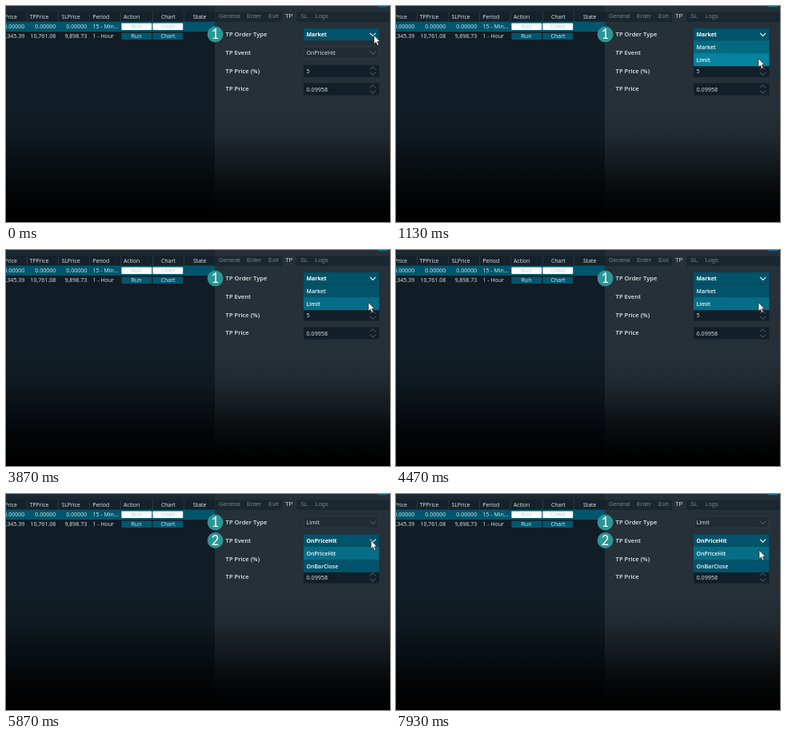
An HTML page that plays this animation: 480x270 px, repeating every 8000 ms.

```html
<!DOCTYPE html>
<html lang="en">
<head>
<meta charset="utf-8">
<title>Order settings</title>
<style>
  html, body { margin: 0; width: 100%; height: 100%; overflow: hidden; background: #000; }
  svg { display: block; width: 480px; height: 270px; }
  text { font: 500 7px "Open Sans", "Noto Sans", sans-serif; fill: #e2e8eb; white-space: pre; }
  .end { text-anchor: end; }
  .mid { text-anchor: middle; }
  .head { font-size: 6.9px; }
  .tab { font: 7.5px "Liberation Sans", Arial, sans-serif; }
  .label { font-size: 7.6px; font-weight: 600; }
  .value { font-size: 7.2px; }
  .item { font-weight: 600; fill: #f4f9fb; }
  .strong { font-weight: 700; fill: #fff; }
  .hover { font-weight: 600; fill: #4bbbdc; }
  .badge { font: 16.5px Lato, sans-serif; fill: #fff; text-anchor: middle; }
</style>
</head>
<body>
<svg id="stage" viewBox="0 0 480 270"></svg>
<script>
const LOOP = 8000;
const TEAL = '#00536a', HOVER = '#066d87', PANEL = '#253038';

const rect = (x, y, w, h, fill, extra = '') =>
  `<rect x="${x}" y="${y}" width="${w}" height="${h}" fill="${fill}" ${extra}/>`;
const text = (x, y, str, cls = '', extra = '') =>
  `<text x="${x}" y="${y}" class="${cls}" ${extra}>${str}</text>`;
const path = (d, stroke, width = 1) =>
  `<path d="${d}" fill="none" stroke="${stroke}" stroke-width="${width}"/>`;
const clamp = v => Math.max(0, Math.min(1, v));
const ease = (t, from, to) => { const k = clamp((t - from) / (to - from)); return k * k * (3 - 2 * k); };
const mix = (a, b, k) => 'rgb(' + a.map((v, i) => Math.round(v + (b[i] - v) * k)) + ')';

function table() {
  let s = rect(0, 0, 261, 270, '#111d26') + rect(0, 0, 261, 7.5, '#1b2830') +
    rect(0, 8, 261, 11, '#15222b') + rect(0, 19.5, 261, 12.5, '#00566d');
  for (const x of [26, 65, 104, 143, 183, 222]) s += rect(x, 8, .7, 11, '#33424c');
  [[-2, 'Price'], [29.5, 'TPPrice'], [69.5, 'SLPrice'], [108.3, 'Period'],
   [147, 'Action'], [194, 'Chart'], [234, 'State']].forEach(([x, h]) => s += text(x, 16, h, 'head'));
  [['0.00000', '0.00000', '0.00000', '15 - Min...'],
   ['10,345.39', '10,761.08', '9,898.73', '1 - Hour']].forEach((row, i) => {
    const y = 28.3 + 12 * i;
    row.slice(0, 3).forEach((v, j) => s += text(23.2 + 39 * j, y, v, 'end'));
    s += text(108.5, y, row[3]);
    ['Run', 'Chart'].forEach((v, j) => {
      s += rect(144.4 + 39 * j, 21.4 + 12 * i, 37.8, 8.7, i ? '#00566d' : '#fdfeff', 'rx=".8"') +
        text(163 + 39.5 * j, y, v, 'mid', i ? '' : 'style="fill:#9fd6ea"');
    });
  });
  return s;
}

function panel() {
  let s = rect(261, 0, 219, 270, PANEL) + rect(261, 7.5, 219, 12.5, '#1b272f') +
    rect(345, 7.5, 18, 12.5, PANEL) + rect(464.5, 0, 12.5, 1.3, '#08708f');
  [[266, 'General'], [301, 'Enter'], [328, 'Exit'], [349, 'TP'], [368, 'SL'], [386.5, 'Logs']]
    .forEach(([x, name]) => s += text(x, 15.3, name, 'tab', `style="fill:${name === 'TP' ? '#cfd6da' : '#74828b'}"`));
  ['TP Order Type', 'TP Event', 'TP Price (%)', 'TP Price']
    .forEach((name, i) => s += text(274.6, 38 + 22.8 * i, name, 'label'));
  [[73.7, '5'], [96.5, '0.09958']].forEach(([y, v]) => {
    s += rect(372, y, 94.5, 15, '#131f28') + text(375.5, y + 10.2, v, 'value') +
      path(`M455 ${y + 5.8}l3.5 -3.5l3.5 3.5M455 ${y + 9.2}l3.5 3.5l3.5 -3.5`, '#66747d', .9);
  });
  return s;
}

const shade = '<defs><linearGradient id="dark" x1="0" y1="0" x2="0" y2="1">' +
  [0, .15, .48, .82, 1].map((a, i) => `<stop offset="${i / 4}" stop-color="#000" stop-opacity="${a}"/>`).join('') +
  '</linearGradient></defs>' + rect(0, 130, 480, 135, 'url(#dark)') + rect(0, 265, 480, 5, '#000');

// mode: idle, hover or open
function combo(y, value, mode) {
  const open = mode === 'open', hover = mode === 'hover';
  return rect(372.5, y + .2, 93.5, 14.4, open ? TEAL : hover ? '#1a2831' : '#202b33',
      `stroke="${open ? TEAL : hover ? '#12414f' : '#303c44'}" stroke-width=".8"`) +
    text(375.5, y + 10.2, value, open ? 'strong' : hover ? 'hover' : 'value') +
    path(`M455 ${y + 5.8}l3.6 3.6l3.6 -3.6`, open ? '#e8f2f5' : '#66747d', open ? 1.2 : .9);
}

function list(y, items, fills) {
  return items.map((item, i) => rect(372, y + 16 * i, 94.5, 16, fills[i]) +
    text(375.5, y + 10.8 + 16 * i, item, 'item')).join('');
}

const badge = (y, n, alpha = 1) => `<g opacity="${alpha}"><circle cx="261.6" cy="${y}" r="9.9" fill="#2b9696"/>` +
  text(261.6, y + 5.8, n, 'badge') + '</g>';

const stops = [[670, 460, 36.5], [1130, 453, 65.5], [5000, 453, 65.5], [5400, 456.2, 57.8],
  [5870, 456.2, 57.8], [6450, 454, 70.2]];
function cursor(t) {
  let [, x, y] = stops[0];
  stops.slice(1).forEach(([end, nx, ny], i) => {
    const k = ease(t, stops[i][0], end), [, px, py] = stops[i];
    x += (nx - px) * k;
    y += (ny - py) * k;
  });
  return `<path transform="translate(${x} ${y}) scale(1.12)" d="M0 0V9.8L2.2 7.8L3.7 11.4L5.4 10.7L3.9 7.2H6.9Z"
    fill="#fff" stroke="#111" stroke-width=".6"/>`;
}

function live(t) {
  const chosen = t >= 5000, firstOpen = t >= 270 && !chosen, secondOpen = t >= 5870;
  let s = combo(28, chosen ? 'Limit' : 'Market', chosen ? 'idle' : 'open') +
    combo(50.8, 'OnPriceHit', secondOpen ? 'open' : t >= 5250 ? 'hover' : 'idle');
  if (firstOpen) {
    const dim = ease(t, 2330, 3870), over = t >= 950;
    s += list(43.2, ['Market', 'Limit'], [
      mix([2, 106, 128], [0, 83, 106], dim),
      over ? mix([6, 131, 158], [6, 109, 135], dim) : TEAL]);
  }
  if (secondOpen) s += list(66, ['OnPriceHit', 'OnBarClose'], [HOVER, TEAL]);
  return s + badge(35.4, 1) + badge(58, 2, ease(t, 5000, 5400)) + cursor(t);
}

const stage = document.getElementById('stage');
stage.innerHTML = table() + panel() + shade + '<g id="live"></g>';
const layer = document.getElementById('live');
const start = performance.now();
function draw() {
  layer.innerHTML = live((performance.now() - start) % LOOP);
  requestAnimationFrame(draw);
}
draw();
</script>
</body>
</html>
```
